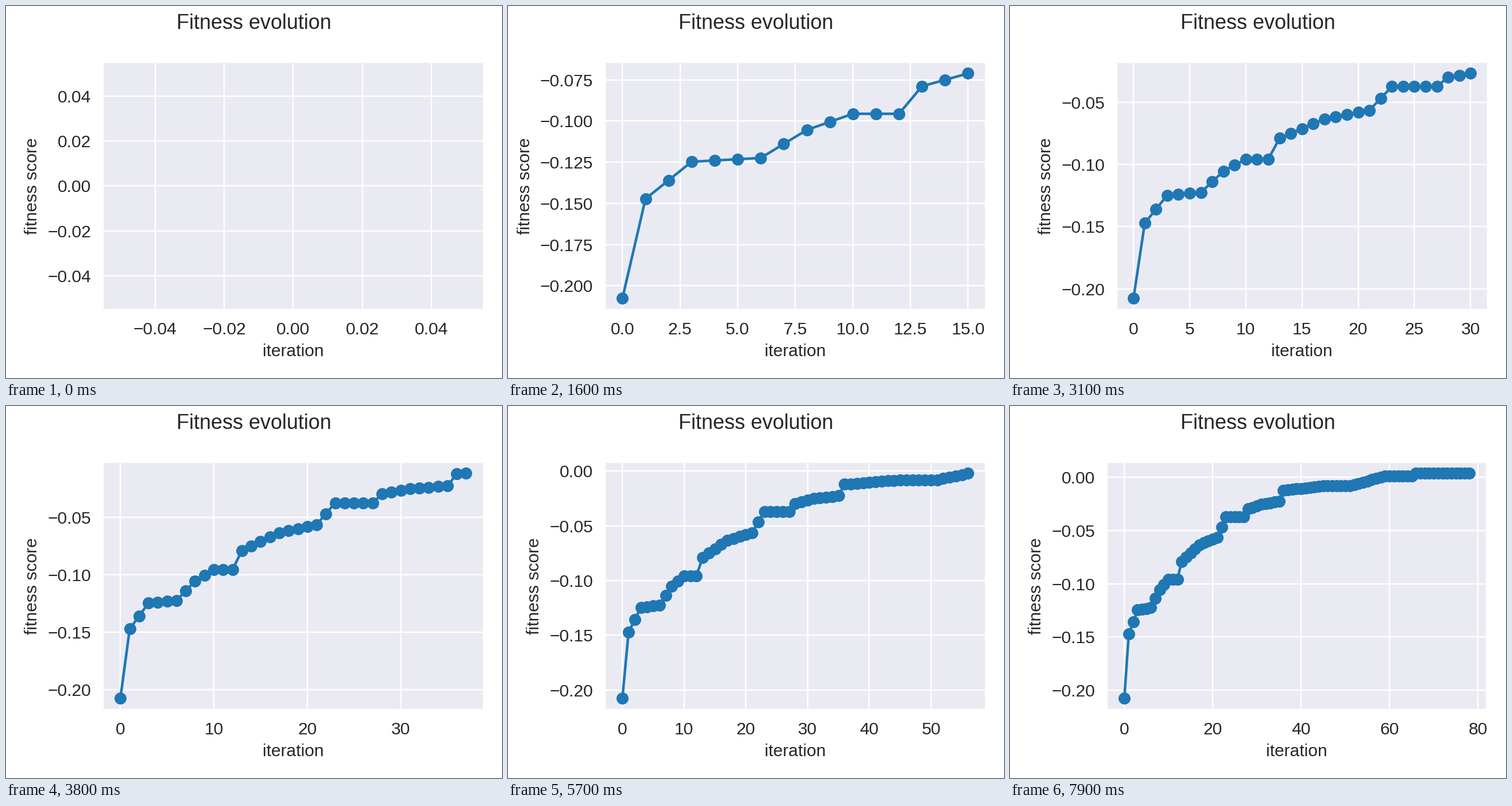
Recreate the animation shown at these times as a matplotlib script. Size 864 px wide and 648 px high, loop 8000 ms.

```python
import numpy as np
import matplotlib.pyplot as plt
from matplotlib.animation import FuncAnimation

INK = "0.15"
plt.rcParams.update({
    "font.family": "Liberation Sans",
    "font.size": 10,
    "text.color": INK,
    "axes.labelcolor": INK,
    "axes.facecolor": "#EAEAF2",
    "axes.edgecolor": "white",
    "axes.grid": True,
    "axes.axisbelow": True,
    "grid.color": "white",
    "xtick.color": INK,
    "ytick.color": INK,
    "xtick.bottom": False,
    "ytick.left": False,
    "lines.solid_capstyle": "round",
})

FRAMES = 80
INTERVAL = 100

# Bends of the learning curve: (iteration, score); flat after the last one.
BENDS = [
    (0, -0.2075), (1, -0.1472), (3, -0.1247), (6, -0.1224), (8, -0.1054),
    (10, -0.0956), (12, -0.0956), (13, -0.0789), (17, -0.0633),
    (21, -0.0563), (23, -0.0373), (27, -0.0373), (28, -0.0297),
    (31, -0.0252), (35, -0.0226), (36, -0.0122), (45, -0.0081),
    (51, -0.0081), (59, 0.0013), (65, 0.0013), (66, 0.0037),
]
steps = np.arange(FRAMES)
scores = np.interp(steps, *zip(*BENDS))

fig, ax = plt.subplots(figsize=(4, 3), dpi=216)
fig.suptitle("Fitness evolution")


def update(n):
    """Show the first n scores, laid out afresh from the default margins."""
    ax.clear()
    fig.subplots_adjust(left=0.125, right=0.9, bottom=0.11, top=0.88)
    ax.plot(steps[:n], scores[:n], "o-", color="#1f77b4")
    ax.set_xlabel("iteration", labelpad=3.35)
    ax.set_ylabel("fitness score")
    fig.tight_layout(rect=(0, 0, 1, 1.003))


anim = FuncAnimation(fig, update, frames=FRAMES, init_func=lambda: None,
                     interval=INTERVAL, repeat=True, repeat_delay=0)
plt.show()
```
